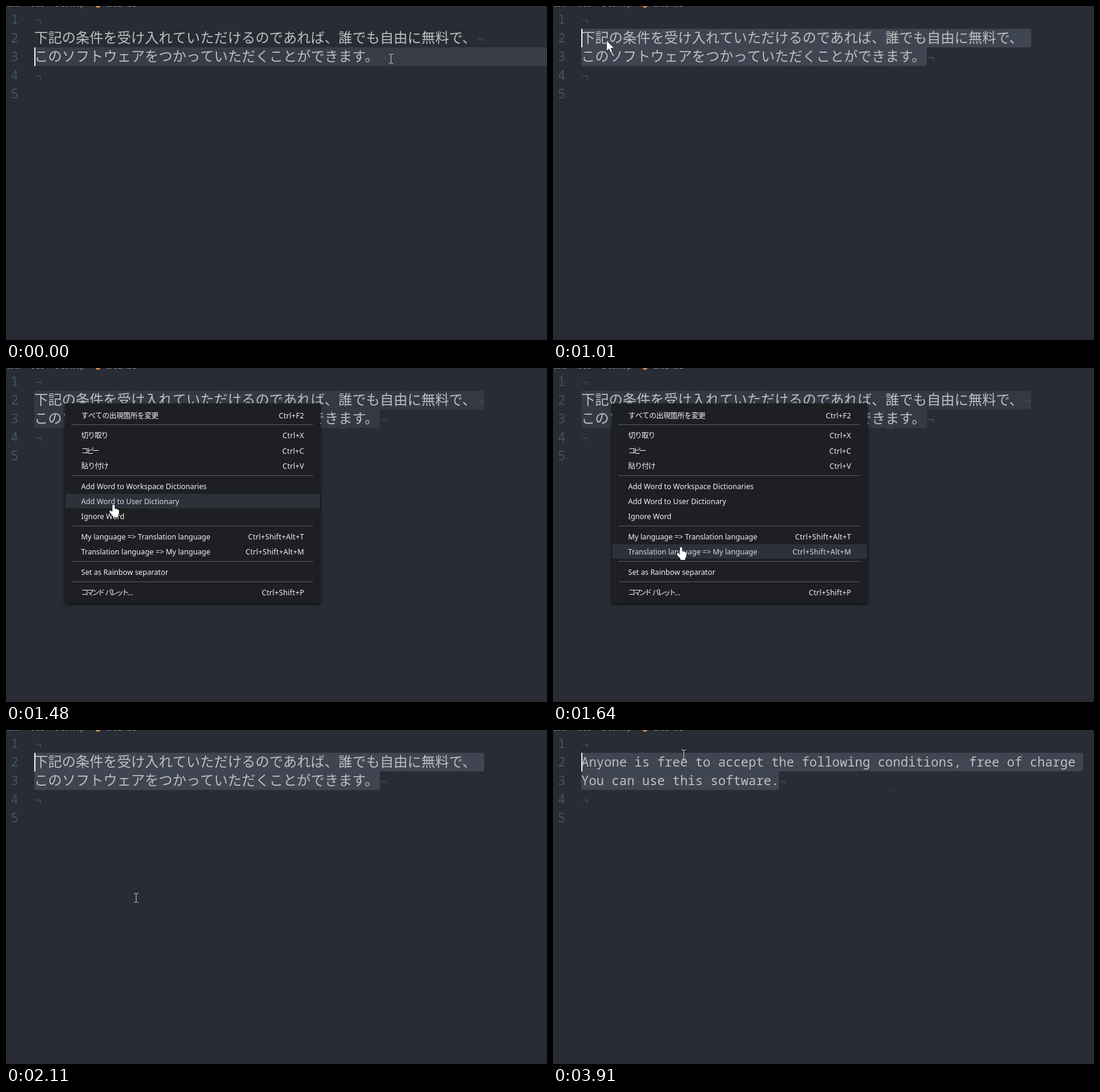
An HTML page with a canvas that plays this animation: 900x557 px, repeating every 4.06 s.

```html
<!DOCTYPE html>
<html lang="ja">
<head>
<meta charset="utf-8">
<title>Editor translation</title>
<style>
  html, body { margin: 0; width: 100%; height: 100%; overflow: hidden; background: #282c34; }
  canvas { display: block; }
</style>
</head>
<body>
<canvas id="stage" width="900" height="557"></canvas>
<script>
const ctx = document.getElementById('stage').getContext('2d');
const LOOP = 4060, LEFT = 47, LINE = 31, WIDE = 23, CELL = 12.65;
const MONO = '21.08px "Noto Sans Mono", monospace';
const KANJI = '23px "Noto Sans CJK JP", "Noto Sans CJK", sans-serif';
const UI = '500 12.2px "Noto Sans", "Noto Sans CJK JP", "Noto Sans CJK", sans-serif';

const JAPANESE = [
  '下記の条件を受け入れていただけるのであれば、誰でも自由に無料で、',
  'このソフトウェアをつかっていただくことができます。'
];
const ENGLISH = [
  'Anyone is free to accept the following conditions, free of charge',
  'You can use this software.'
];

// Label, shortcut, row centre, tracking of Japanese runs
const MENU = [
  ['すべての出現箇所を変更', 'Ctrl+F2', 79, -0.5],
  ['切り取り', 'Ctrl+X', 112, -1.1],
  ['コピー', 'Ctrl+C', 138, -3],
  ['貼り付け', 'Ctrl+V', 163, -0.9],
  ['Add Word to Workspace Dictionaries', '', 197, 0],
  ['Add Word to User Dictionary', '', 222, 0],
  ['Ignore Word', '', 247, 0],
  ['My language => Translation language', 'Ctrl+Shift+Alt+T', 281, 0],
  ['Translation language => My language', 'Ctrl+Shift+Alt+M', 306, 0],
  ['Set as Rainbow separator', '', 340, 0],
  ['コマンド パレット...', 'Ctrl+Shift+P', 374, -3]
];
const RULES = [95, 180, 264, 323, 357];

// Pointer moves: each leg spreads its points evenly from start to end
const LEGS = [
  { start: 0, end: 0, points: [[640, 88]] },
  { start: 70, end: 540, points: [[632, 88], [560, 88], [430, 86], [300, 82], [185, 75], [107, 68], [70, 60]] },
  { start: 640, end: 1160, points: [[46, 56], [46, 56], [48, 56], [60, 57], [76, 58], [90, 59], [100, 59], [100, 59]] },
  { start: 1250, end: 1640, points: [[100, 59], [118, 92], [146, 160], [178, 228], [204, 284], [212, 299]] },
  { start: 1790, end: 1870, points: [[214, 288], [216, 280]] },
  { start: 2030, end: 2430, points: [[216, 280], [216, 280], [216, 225], [217, 140], [217, 70], [217, 41]] }
];

const within = (t, a, b) => t >= a && t < b;
const lineTop = n => 7 + (n - 1) * LINE;
const baseline = n => lineTop(n) + 23;

function pointerAt(t) {
  const leg = LEGS.filter(l => t >= l.start).pop();
  const last = leg.points.length - 1;
  const step = last ? Math.floor((t + 5 - leg.start) / (leg.end - leg.start) * last) : 0;
  const [x, y] = leg.points[Math.min(step, last)];
  return { x, y };
}

function text(str, x, y, font, color, tracking = 0, align = 'left') {
  ctx.font = font;
  ctx.fillStyle = color;
  ctx.textAlign = align;
  ctx.letterSpacing = tracking + 'px';
  ctx.fillText(str, x, y);
  return ctx.measureText(str).width;
}

function rect(x, y, w, h, color) {
  ctx.fillStyle = color;
  ctx.fillRect(x, y, w, h);
}

function roundRect(x, y, w, h, r, color) {
  ctx.fillStyle = color;
  ctx.beginPath();
  ctx.roundRect(x, y, w, h, r);
  ctx.fill();
}

function disc(x, y, r, color) {
  ctx.fillStyle = color;
  ctx.beginPath();
  ctx.arc(x, y, r, 0, Math.PI * 2);
  ctx.fill();
}

function lineEnd(x, n, color = '#454a56') {
  const y = lineTop(n) + 16;
  rect(x + 2, y, 9, 1.5, color);
  rect(x + 9.5, y, 1.5, 6, color);
}

function breadcrumb() {
  const font = '13px "Open Sans", sans-serif', color = '#a0a3a9';
  const parts = [['cals', 0], ['›', 31], ['OSS', 40], ['›', 70], ['Desktop', 81], ['›', 133], ['LICENSE', 167]];
  for (const [str, x] of parts) text(str, x, 1, font, color);
  disc(153, -1, 4, '#c98a4b');
}

// Where the selection begins, or null while nothing is selected
function selectionStart(t, pointer) {
  if (t < 145) return null;
  if (t >= 635) return { line: 2, x: LEFT };
  const col = Math.min(25, Math.round((pointer.x - LEFT) / WIDE));
  return { line: pointer.y < 66 ? 2 : 3, x: LEFT + col * WIDE };
}

function editor(t, pointer) {
  const translated = t >= 2900;
  const lines = translated ? ENGLISH : JAPANESE;
  const advance = translated ? CELL : WIDE;
  const ends = lines.map(s => LEFT + s.length * advance);
  const start = selectionStart(t, pointer);
  const dimmed = within(t, 1160, 2030);

  if (!start) rect(LEFT, lineTop(3), 853, LINE, '#383d48');
  else {
    const color = dimmed ? '#343943' : '#404552';
    if (start.line === 2) roundRect(start.x, lineTop(2), ends[0] + CELL - start.x, LINE, [3, 3, 3, 0], color);
    const x = start.line === 2 ? LEFT : start.x;
    roundRect(x, lineTop(3), ends[1] - x, LINE, [0, 0, 3, 3], color);
  }
  if (t >= 145) rect(555, 100, 10, 1, '#3d424e');

  for (let n = 1; n <= 5; n++) text(String(n), 8, baseline(n), MONO, '#495062');
  lineEnd(LEFT, 1);
  lineEnd(LEFT, 4);
  lines.forEach((str, i) => {
    const selected = start && start.line === 2 && i === 0 && !dimmed;
    lineEnd(ends[i], i + 2, selected ? '#464b57' : '#454a56');
    text(str, LEFT, baseline(i + 2), translated ? MONO : KANJI, '#bfbfbf');
    if (translated) [...str].forEach((ch, k) => {
      if (ch === ' ') rect(LEFT + (k + 0.5) * CELL - 1, lineTop(i + 2) + 16, 2, 2, '#50555f');
    });
  });

  if (dimmed || within(t, 2590, 2900) || within(t, 3430, 3910)) return;
  let caret = start || { line: 3, x: LEFT };
  if (within(t, 70, 145)) caret = { line: 3, x: ends[1] };
  rect(caret.x, lineTop(caret.line), 2, LINE, '#f2f2f2');
}

function hoveredRow(pointer) {
  return MENU.find(row => Math.abs(pointer.y - row[2]) <= 12.5);
}

// Tightens only the Japanese runs, leaving spaces and dots at full width
function menuLabel(label, x, y, color, tracking) {
  for (const run of label.match(/[\u3000-\u9fff]+|[^\u3000-\u9fff]+/g)) {
    x += text(run, x, y, UI, color, run.charCodeAt(0) > 0x2fff ? tracking : 0);
  }
}

function menu(pointer) {
  ctx.save();
  ctx.shadowColor = 'rgba(0,0,0,.75)';
  ctx.shadowBlur = 5;
  ctx.shadowOffsetY = 2;
  rect(98, 59, 425, 333, '#1e1f23');
  ctx.restore();
  for (const y of RULES) rect(109, y - 1, 402, 1, '#5b5c5f');
  const hovered = hoveredRow(pointer);
  for (const row of MENU) {
    const [label, keys, y, tracking] = row;
    if (row === hovered) rect(99, y - 12, 423, 24, '#2c313a');
    const color = row === hovered ? '#d7dae0' : '#f2f2f2';
    menuLabel(label, 125, y + 5, color, tracking);
    text(keys, 496, y + 5, UI, color, 0.25, 'right');
  }
}

function outline(points, x, y) {
  ctx.beginPath();
  points.forEach(([px, py]) => ctx.lineTo(x + px, y + py));
  ctx.closePath();
  ctx.fillStyle = '#fff';
  ctx.strokeStyle = '#111';
  ctx.lineWidth = 1;
  ctx.stroke();
  ctx.fill();
}

function beam({ x, y }) {
  const color = '#d0d0d0';
  rect(x, y - 7, 1, 14, color);
  for (const edge of [y - 8, y + 7]) {
    rect(x - 3, edge, 3, 1, color);
    rect(x + 1, edge, 3, 1, color);
  }
}

function arrow({ x, y }) {
  outline([[0, 0], [0, 16], [3.7, 12.6], [6.3, 18.3], [8.8, 17.2], [6.3, 11.6], [11.3, 11.3]], x - 0.5, y - 0.5);
}

function hand({ x, y }) {
  outline([[-1, 1], [0, 0], [2, 0], [3, 1], [3, 7], [6, 7], [9, 8.5], [10, 10],
    [10, 15], [8, 18], [8, 21], [0, 21], [0, 19], [-6, 12], [-5, 10], [-3, 10], [-1, 12]], x, y);
}

function drawPointer(t, pointer) {
  const dragging = within(t, 70, 780), clicking = within(t, 1865, 2030);
  if (dragging || clicking) disc(pointer.x - 1, pointer.y, 12, 'rgba(235,220,10,.55)');
  if (within(t, 780, 1250)) arrow(pointer);
  else if (within(t, 1250, 2030)) (hoveredRow(pointer) ? hand : arrow)(pointer);
  else beam(pointer);
}

function draw(t) {
  const pointer = pointerAt(t);
  rect(0, 0, 900, 557, '#282c34');
  rect(0, 553, 900, 4, '#2a2831');
  breadcrumb();
  editor(t, pointer);
  if (within(t, 1250, 2030)) menu(pointer);
  drawPointer(t, pointer);
}

const began = performance.now();
function tick() {
  draw((performance.now() - began) % LOOP);
  requestAnimationFrame(tick);
}
tick();
</script>
</body>
</html>
```
